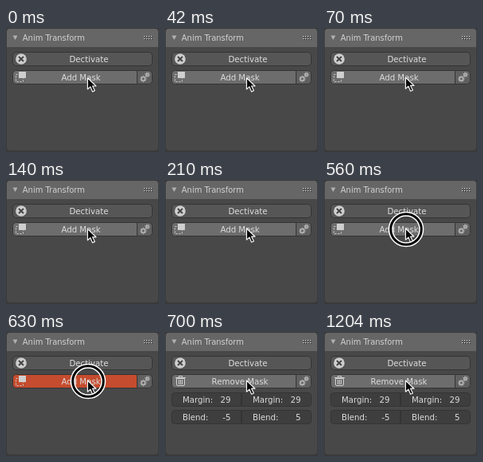
These frames come from a looping animation (192 px wide and 156 px high, 1540 ms). An HTML page with a canvas:

```html
<!DOCTYPE html>
<html lang="en">
<head>
<meta charset="utf-8">
<title>Panel</title>
<style>
html, body { margin: 0; width: 100%; height: 100%; overflow: hidden; background: #3a3a3a; }
canvas { display: block; width: 192px; height: 156px; }
</style>
</head>
<body>
<canvas id="stage" width="192" height="156"></canvas>
<script>
const ctx = document.getElementById('stage').getContext('2d');
const LOOP = 1540, STEP = 70;
const PRESS = 560, ACTIVE = 630, DONE = 700;
const C = {
  edge: '#3a3a3a', head: '#666666', body: '#484848', line: '#343434',
  button: '#565656', hover: '#6d6d6d', gear: '#606060', field: '#3e3e3e',
  red: '#c54c2e', text: '#dcdcdc', title: '#d2d2d2', icon: '#cfcfcf', dim: '#b0b0b0'
};

function rounded(x, y, w, h, radii, fill, stroke) {
  ctx.beginPath();
  ctx.roundRect(x, y, w, h, radii);
  ctx.fillStyle = fill;
  ctx.fill();
  if (stroke) {
    ctx.strokeStyle = stroke;
    ctx.lineWidth = 1;
    ctx.stroke();
  }
}

function label(str, x, y, align = 'left', size = 10.2, color = C.text) {
  ctx.font = `${size}px "DejaVu Sans", sans-serif`;
  ctx.textAlign = align;
  ctx.textBaseline = 'alphabetic';
  ctx.fillStyle = color;
  ctx.fillText(str, x, y);
}

function trace(points) {
  ctx.beginPath();
  points.forEach(([x, y]) => ctx.lineTo(x, y));
  ctx.closePath();
}

function circle(x, y, r, color, width) {
  ctx.beginPath();
  ctx.arc(x, y, r, 0, Math.PI * 2);
  if (width) {
    ctx.strokeStyle = color;
    ctx.lineWidth = width;
    ctx.stroke();
  } else {
    ctx.fillStyle = color;
    ctx.fill();
  }
}

function panel() {
  ctx.fillStyle = C.edge;
  ctx.fillRect(0, 0, 192, 156);
  rounded(1, 1, 190, 153, 4, C.body);
  rounded(1, 1, 190, 23, [4, 4, 0, 0], C.head);
  trace([[8.5, 9.5], [14.5, 9.5], [11.5, 15]]);
  ctx.fillStyle = C.dim;
  ctx.fill();
  label('Anim Transform', 20.8, 16, 'left', 9.95, C.title);
  for (let i = 0; i < 8; i++) {
    const x = 173 + (i % 4) * 3, y = 10 + (i >> 2) * 3;
    ctx.fillStyle = '#343434';
    ctx.fillRect(x + 1, y + 1, 1, 1);
    ctx.fillStyle = '#dadada';
    ctx.fillRect(x, y, 1, 1);
  }
}

function closeIcon() {
  circle(19, 39, 6.8, C.icon);
  ctx.strokeStyle = '#454545';
  ctx.lineWidth = 2;
  ctx.beginPath();
  ctx.moveTo(16, 36); ctx.lineTo(22, 42);
  ctx.moveTo(22, 36); ctx.lineTo(16, 42);
  ctx.stroke();
}

function maskIcon() {
  ctx.strokeStyle = C.icon;
  ctx.lineWidth = 1;
  ctx.setLineDash([2, 2]);
  ctx.strokeRect(12.5, 58.5, 9, 9);
  ctx.setLineDash([]);
  ctx.fillStyle = C.icon;
  ctx.fillRect(16, 55, 9, 8);
}

function trashIcon() {
  ctx.strokeStyle = C.icon;
  ctx.lineWidth = 1;
  ctx.strokeRect(17.5, 55.5, 4, 2);
  ctx.fillStyle = C.icon;
  ctx.fillRect(13, 57, 13, 1);
  ctx.beginPath();
  ctx.roundRect(14.5, 58.5, 10, 9, [0, 0, 1.5, 1.5]);
  ctx.stroke();
  for (const x of [17, 19, 21]) ctx.fillRect(x, 60, 1, 6);
}

function gear(x, y, r, teeth) {
  circle(x, y, r, C.dim, 1.8);
  ctx.beginPath();
  for (let i = 0; i < teeth; i++) {
    const a = i * Math.PI * 2 / teeth, c = Math.cos(a), s = Math.sin(a);
    ctx.moveTo(x + c * r, y + s * r);
    ctx.lineTo(x + c * (r + 1.9), y + s * (r + 1.9));
  }
  ctx.lineWidth = 1.1;
  ctx.stroke();
}

function field(name, value, x, y) {
  const left = x < 90;
  rounded(x + .5, y + .5, 87, 17, left ? [4, 0, 0, 4] : [0, 4, 4, 0], C.field, C.line);
  label(name, x + 14, y + 13);
  label(value, x + 74.5, y + 13, 'right');
}

function cursor(x, y) {
  trace([[0, 0], [0, 14.2], [3.5, 11.1], [6.2, 17.3], [9, 16], [6.2, 10.2], [10.6, 10.2]]
    .map(([dx, dy]) => [x + dx, y + dy]));
  ctx.lineJoin = 'round';
  ctx.fillStyle = '#080808';
  ctx.strokeStyle = '#f4f4f4';
  ctx.lineWidth = 1.2;
  ctx.fill();
  ctx.stroke();
}

function ring() {
  circle(103, 62, 19.3, '#ffffff', 6);
  circle(103, 62, 19.3, '#000000', 3);
}

function draw(t) {
  const done = t >= DONE;
  const active = t >= ACTIVE && !done;
  panel();

  rounded(8.5, 30.5, 175, 17, 4, C.button, C.line);
  closeIcon();
  label('Dectivate', 104, 43, 'center');

  rounded(8.5, 53.5, 156, 17, [4, 0, 0, 4], active ? C.red : C.hover, C.line);
  rounded(164.5, 53.5, 19, 17, [0, 4, 4, 0], C.gear, C.line);
  if (done) trashIcon(); else maskIcon();
  label(done ? 'Remove Mask' : 'Add Mask', 94, 66, 'center');
  gear(172.3, 64, 2.3, 8);
  gear(177.4, 58.8, 1.5, 7);

  if (done) {
    field('Margin:', '29', 8, 76);
    field('Margin:', '29', 96, 76);
    field('Blend:', '-5', 8, 98);
    field('Blend:', '5', 96, 98);
  }

  // The pointer settles upward in whole steps.
  const settle = Math.min(3, Math.floor(t / STEP)) / 3;
  cursor(102.4, 62.8 - 1.8 * settle);
  if (t >= PRESS && !done) ring();
}

const start = performance.now();
function tick() {
  draw((performance.now() - start) % LOOP);
  requestAnimationFrame(tick);
}
tick();
</script>
</body>
</html>
```
